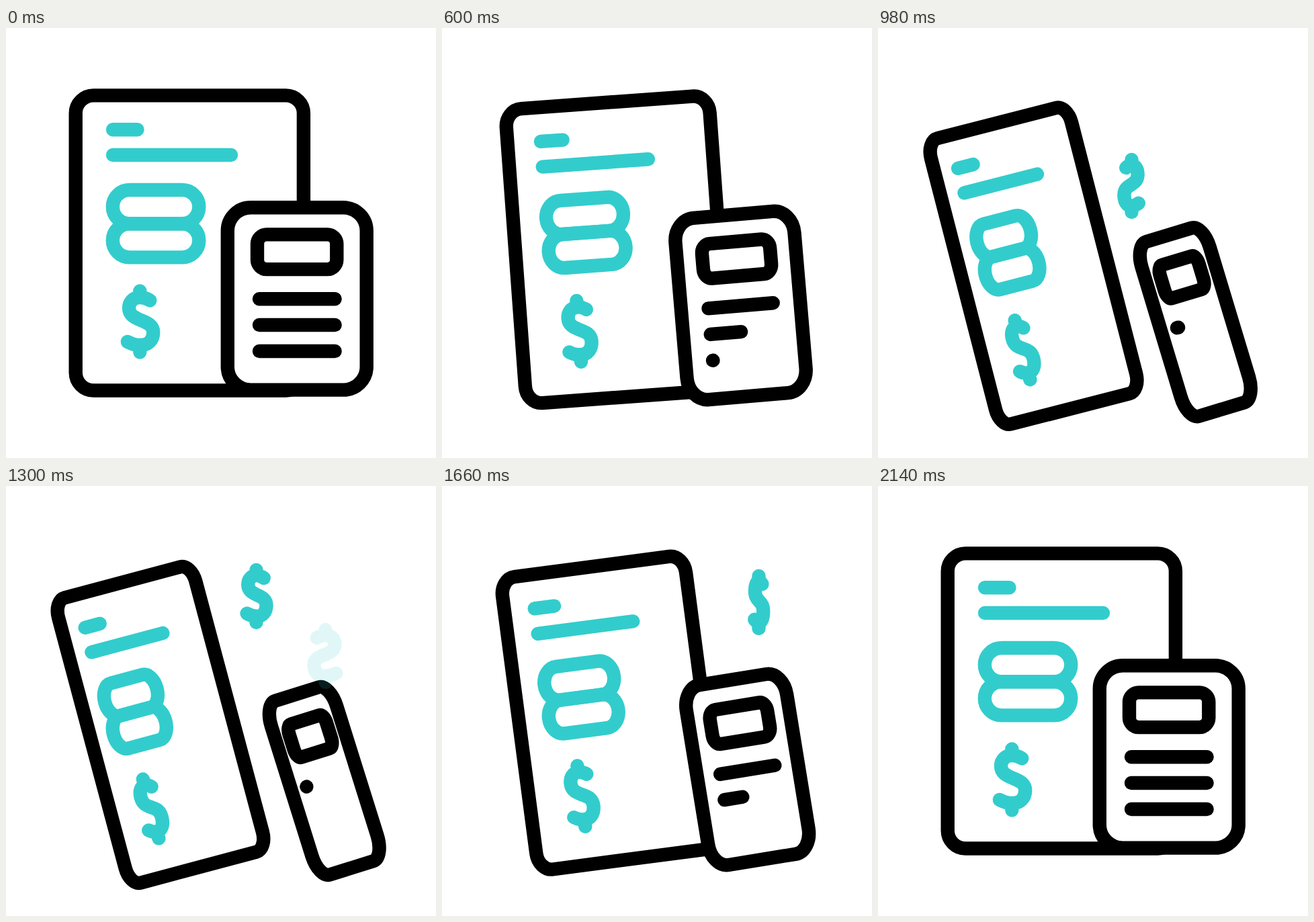
An HTML page for the animation above (2400 ms loop, 640x640 px).

```html
<!DOCTYPE html>
<html lang="en">
<head>
<meta charset="utf-8">
<title>Invoice and calculator</title>
<style>
  html, body { margin: 0; width: 100%; height: 100%; overflow: hidden; background: #fff; }
  svg { display: block; width: 100vw; height: 100vh; }
  svg * { vector-effect: non-scaling-stroke; }
  .ink { stroke: #000; }
  .teal { stroke: #3cc; }
</style>
</head>
<body>
<svg viewBox="0 0 640 640" fill="none" stroke-width="20.4" stroke-linecap="round" stroke-linejoin="round">
  <defs>
    <path id="dollar" d="M199.3 391.5V401M199.3 472V482.5M214.3 405.5C209 402 205 401 199.5 401C189.5 401 183 407.5 183 417C183 427.5 192 431 201 435C212 439.5 219.2 443 219.2 453C219.2 465 211 472 201 472C192 472 188 470.5 180.8 467"/>
  </defs>
  <g id="doc">
    <rect class="ink" x="103.7" y="100.4" width="339.2" height="439.1" rx="26.5" fill="#fff"/>
    <g class="teal">
      <path d="M159 151.2H195.5M159 189H335"/>
      <rect x="158.8" y="241" width="128.5" height="50.2" rx="25.1"/>
      <rect x="158.8" y="291.2" width="128.5" height="50.2" rx="25.1"/>
      <use href="#dollar"/>
    </g>
  </g>
  <g id="calc" class="ink">
    <rect x="329.8" y="267.3" width="206.9" height="271.3" rx="34.5" fill="#fff"/>
    <rect x="374" y="307.4" width="118.3" height="51.7" rx="14"/>
    <path class="row"/>
    <path class="row"/>
    <path class="row"/>
  </g>
  <g class="fly teal"><use href="#dollar"/></g>
  <g class="fly teal"><use href="#dollar"/></g>
</svg>
<script>
const LOOP = 2400, STEP = 20;

// Each part leans away during `out` and comes back during `back`.
const parts = [
  { id: 'doc', cx: 273.3, cy: 320, dx: -43.3, dy: 35.5, turn: -14.95, squeeze: 0.377, out: [355, 1060], back: [1300, 2020] },
  { id: 'calc', cx: 433.25, cy: 403, dx: 40.5, dy: 36, turn: -17.4, squeeze: 0.508, out: [355, 1060], back: [1314, 2034] }
];

// Rows retract from the bottom up and grow again from the top down.
const rows = [
  { y: 403.3, out: [689, 1020], back: [1300, 1600], dot: true },
  { y: 442, out: [460, 730], back: [1532, 1863] },
  { y: 481, out: [284, 614], back: [1790, 2130] }
];

const coins = [
  { start: 800, x: 380.3, y: 275, drift: -0.0156 },
  { start: 1280, x: 475.7, y: 257.4, drift: -0.0111 }
];
const COIN_LIFE = 800, COIN_FADE = 140, COIN_SIZE = 0.857;

const clamp = v => Math.min(1, Math.max(0, v));
function ease(t, [a, b]) {
  const x = clamp((t - a) / (b - a));
  return x * x * (3 - 2 * x);
}
const away = (t, { out, back }) => ease(t, out) - ease(t, back);

const rowEls = document.querySelectorAll('.row');
const coinEls = document.querySelectorAll('.fly');
for (const part of parts) part.el = document.getElementById(part.id);

function draw(t) {
  for (const part of parts) {
    const { el, cx, cy, dx, dy, turn, squeeze } = part;
    const p = away(t, part);
    el.setAttribute('transform',
      `translate(${cx + dx * p} ${cy + dy * p}) rotate(${turn * p}) ` +
      `scale(${1 - squeeze * p} 1) translate(${-cx} ${-cy})`);
  }

  rows.forEach((row, i) => {
    const left = 1 - away(t, row);
    const shown = row.dot || left > 0.001;
    rowEls[i].setAttribute('d', `M377 ${row.y}h${Math.max(0.01, 112.6 * left)}`);
    rowEls[i].setAttribute('visibility', shown ? 'visible' : 'hidden');
  });

  coins.forEach((coin, i) => {
    const age = t - coin.start;
    const angle = (0.319 * age - 8) * Math.PI / 180;
    const flip = -Math.cos(angle) || 0.001;
    const x = coin.x + coin.drift * age;
    const y = coin.y - 0.222 * age;
    coinEls[i].setAttribute('opacity', clamp(Math.min(age, COIN_LIFE - age) / COIN_FADE));
    coinEls[i].setAttribute('transform',
      `translate(${x} ${y}) scale(${COIN_SIZE * flip} ${COIN_SIZE}) translate(-199.3 -437)`);
  });
}

const begin = performance.now();
function tick() {
  const t = (performance.now() - begin) % LOOP;
  draw(Math.floor(t / STEP) * STEP);
  requestAnimationFrame(tick);
}
draw(0);
requestAnimationFrame(tick);
</script>
</body>
</html>
```
